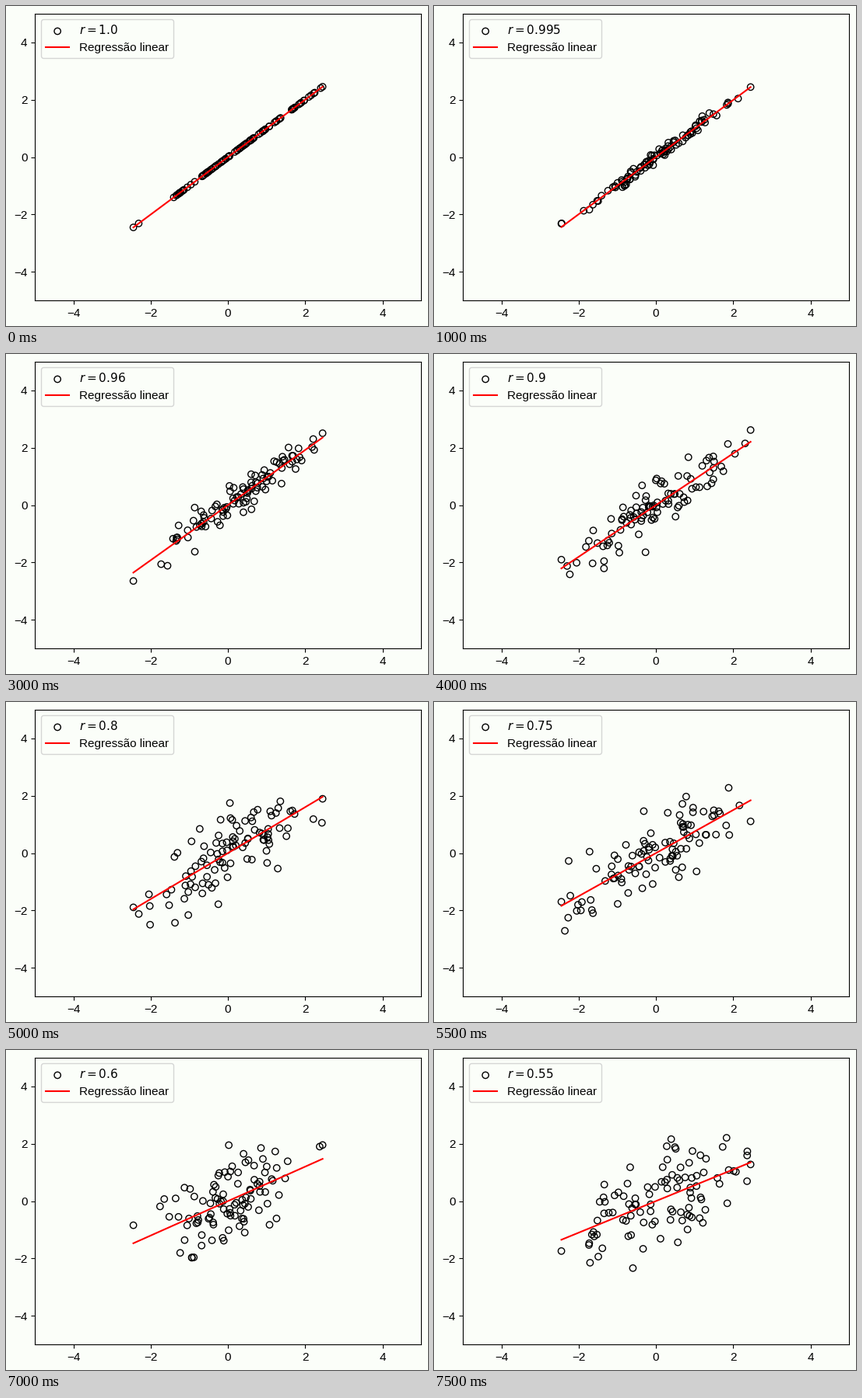
Write a matplotlib script that moves like this. It is 542 px wide and 412 px high and loops after 8 s.

```python
import numpy as np
import matplotlib.pyplot as plt
from matplotlib.animation import FuncAnimation

W, H, DPI = 542, 412, 100
N_POINTS = 100
REACH = 2.45
BG = "#fbfef9"

plt.rcParams.update({
    "font.family": "Liberation Sans",
    "font.size": 11,
    "figure.facecolor": BG,
    "axes.facecolor": BG,
})

# slow departure from a perfect fit, then steps of 0.05
R = np.concatenate([[1, 0.999, 0.995],
                    np.linspace(0.99, 0.95, 5),
                    np.linspace(0.9, 0.55, 8)]).round(3)


def sample(i):
    """Normal cloud whose fitted slope is exactly R[i]."""
    rng = np.random.default_rng(i)
    x, noise = rng.standard_normal((2, N_POINTS))
    x = np.interp(x, [x.min(), x.max()], [-REACH, REACH])
    noise -= np.polyval(np.polyfit(x, noise, 1), x)
    return x, R[i] * x + np.sqrt(1 - R[i] ** 2) * noise


fig = plt.figure(figsize=(W / DPI, H / DPI), dpi=DPI)
ax = fig.add_axes([37.1 / W, 32.7 / H, 496 / W, 369.6 / H])
ax.set(xlim=(-5, 5), ylim=(-5, 5),
       xticks=range(-4, 5, 2), yticks=range(-4, 5, 2))

dots = ax.scatter([0], [0], facecolors="none", edgecolors="black",
                  label="$r = 1.0$")
line, = ax.plot([], [], color="red", label="Regressão linear")
r_text = ax.legend(loc="upper left").get_texts()[0]


def update(i):
    x, y = sample(i)
    ends = np.array([x.min(), x.max()])
    dots.set_offsets(np.column_stack([x, y]))
    line.set_data(ends, np.polyval(np.polyfit(x, y, 1), ends))
    r_text.set_text(f"$r = {R[i]}$")
    return dots, line, r_text


anim = FuncAnimation(fig, update, frames=len(R), interval=500,
                     repeat=True, repeat_delay=0)
plt.show()
```
